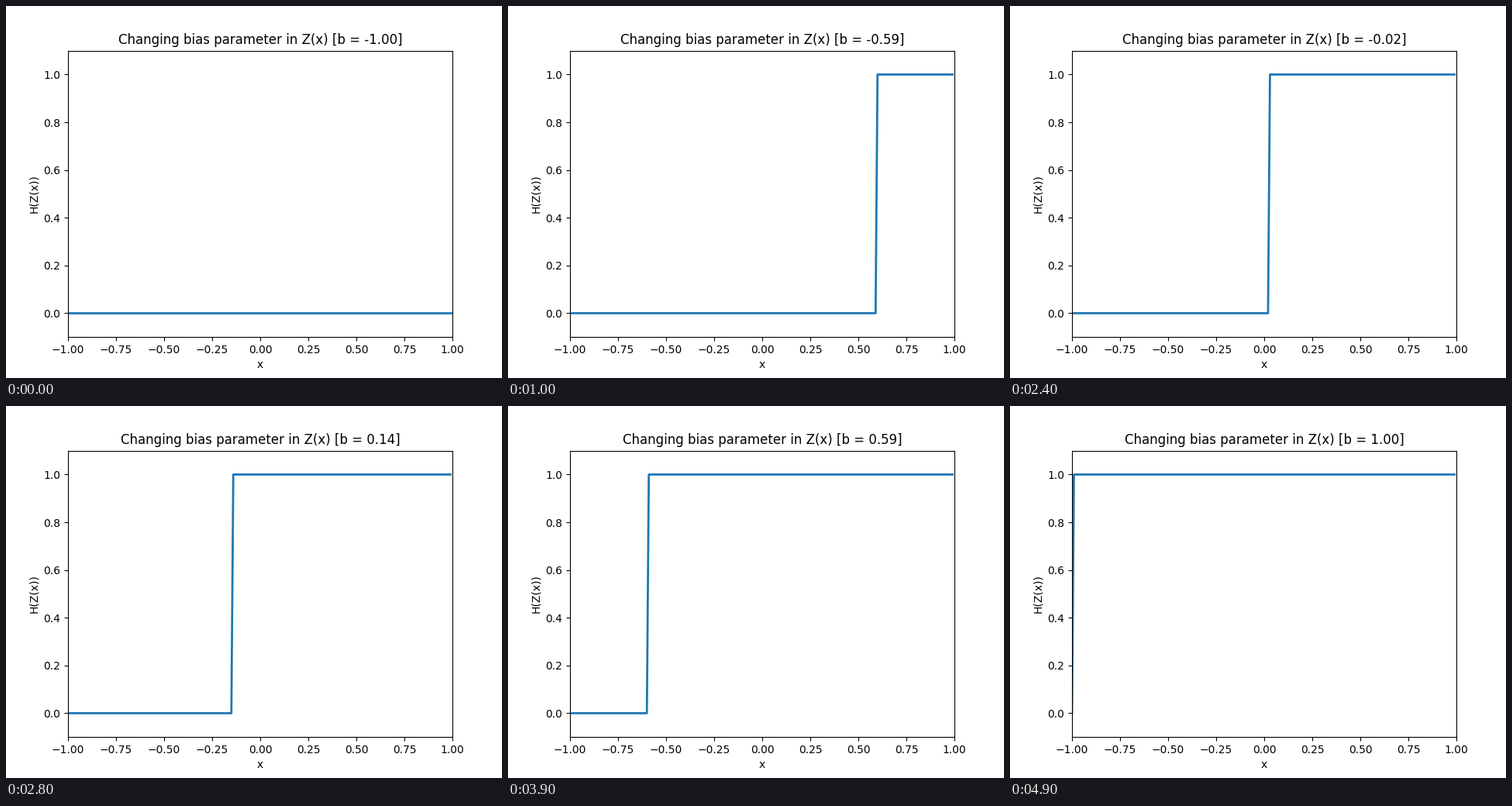
A matplotlib script for the animation above (5 s loop, 640x480 px).

```python
import matplotlib.pyplot as plt
import numpy as np
from matplotlib.animation import FuncAnimation

FRAMES = 50
INTERVAL = 100

x = np.arange(-1, 1, 0.01)
biases = np.linspace(-1, 1, FRAMES)

fig, ax = plt.subplots(figsize=(6.4, 4.8), dpi=100)
ax.set_xlim(-1, 1)
ax.set_ylim(-0.1, 1.1)
ax.set_xlabel("x")
ax.set_ylabel("H(Z(x))")
line, = ax.plot([], [], lw=2)
title = ax.set_title("")


def update(frame):
    bias = biases[frame]
    line.set_data(x, np.heaviside(x + bias, 0))
    title.set_text(f"Changing bias parameter in Z(x) [b = {bias:.2f}]")
    return line, title


anim = FuncAnimation(fig, update, frames=FRAMES, interval=INTERVAL,
                     repeat=True, repeat_delay=0, blit=False)
plt.show()
```
